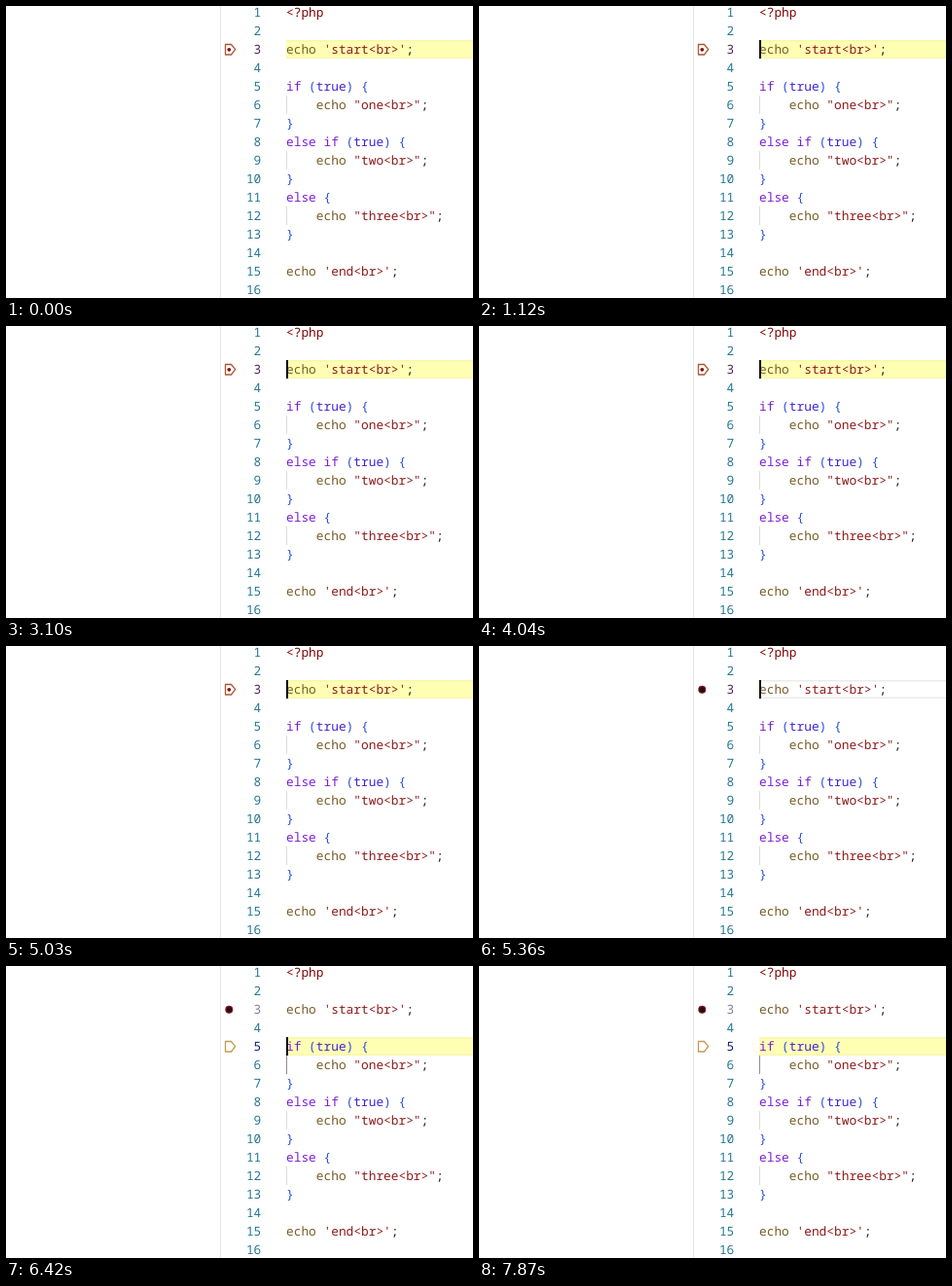
An HTML page for the animation above (8000 ms loop, 480x300 px).

```html
<!DOCTYPE html>
<html lang="en">
<head>
<meta charset="utf-8">
<title>Stepping through code</title>
<style>
  html, body { margin: 0; width: 100%; height: 100%; overflow: hidden; background: #fff; }
  svg { display: block; }
  text {
    font: 12.83px "Noto Sans Mono", "DejaVu Sans Mono", monospace;
    font-variant-ligatures: none;
    text-rendering: geometricPrecision;
    white-space: pre;
    fill: #222;
  }
  .num { text-anchor: end; fill: #237893; }
  .tag { fill: #800000; }
  .echo { fill: #795e26; }
  .str { fill: #8f1a1a; }
  .key { fill: #7c1fd4; }
  .bool { fill: #3f25d0; }
  .brace { fill: #2b4fdc; }
</style>
</head>
<body>
<svg width="480" height="300" viewBox="0 0 480 300">
  <rect x="220" width="1" height="300" fill="#e6e6e6"/>
  <rect id="step" x="288" width="192" height="19" fill="#ffffb4"/>
  <path id="border" d="M288 0h192v1.5h-192zM288 17.5h192v1.5h-192z"/>
  <g id="code"></g>
  <path id="arrow" d="M225.5 4.5h6l4.2 5.2l-4.2 5.3h-6z" fill="#fff" stroke-width="1.3" stroke-linejoin="round"/>
  <circle id="dot" cx="229.3" cy="44.8" stroke="#7d1420"/>
  <rect id="cursor" x="288" width="2" height="19"/>
</svg>
<script>
const LOOP = 8000, ROW = 19, LEFT = 288, CHAR = 7.7;
const RELEASE = 5360, NEXT = 5430;
const GUIDE = "#d9ddd2";
const blinks = [130, 590, 1120, 1580, 2110, 2570, 3100, 3580, 4040, 4570, 5030,
                5890, 6420, 6880, 7410, 7870];
const lines = `<?php

echo 'start<br>';

if (true) {
    echo "one<br>";
}
else if (true) {
    echo "two<br>";
}
else {
    echo "three<br>";
}

echo 'end<br>';
`.split("\n");

const rules = [
  ["tag", /^<\?php/], ["echo", /^echo/], ["str", /^['"]/],
  ["key", /^(if|else)/], ["bool", /^true/], ["brace", /^[(){}]/]
];
const get = id => document.getElementById(id);
const set = (id, attrs) => { for (const k in attrs) get(id).setAttribute(k, attrs[k]); };
const rowTop = n => ROW * n - 22;

function paint(line) {
  const tokens = line.match(/<\?php|'[^']*'|"[^"]*"|\w+|\s+|./g) || [];
  return tokens.map(token => {
    const rule = rules.find(([, pattern]) => pattern.test(token));
    return `<tspan class="${rule ? rule[0] : ""}">${token.replace(/</g, "&lt;")}</tspan>`;
  }).join("");
}

get("code").innerHTML = lines.map((line, i) => {
  const n = i + 1, y = rowTop(n) + 14, indent = line.search(/\S|$/);
  const guide = indent
    ? `<rect id="guide${n}" x="${LEFT}" y="${rowTop(n)}" width="1" height="${ROW}" fill="${GUIDE}"/>` : "";
  return `${guide}<text id="num${n}" class="num" x="262.3" y="${y}">${n}</text>
    <text x="${LEFT + indent * CHAR}" y="${y}">${paint(line.trim())}</text>`;
}).join("");

function draw(t) {
  const held = t < RELEASE, moved = t >= NEXT, paused = held || moved;
  const y = rowTop(moved ? 5 : 3), transform = `translate(0 ${y})`;
  const visibility = paused ? "visible" : "hidden";
  const on = blinks.filter(b => b <= t).length % 2;

  set("step", { y, visibility });
  set("border", { transform, "fill-opacity": paused ? 0.03 : 0.08 });
  set("arrow", { transform, visibility, stroke: moved ? "#c39a52" : "#b0562c" });
  set("dot", {
    r: held ? 1.9 : 3.4,
    fill: held ? "#7d1420" : "#2c0a10",
    "stroke-width": held ? 0 : 1.2
  });
  get("num3").style.fill = moved ? "#83809c" : "#54245c";
  get("num5").style.fill = moved ? "#0b216f" : "";
  set("guide6", { fill: moved ? "#968c86" : GUIDE });
  set("cursor", { y, visibility: on ? "visible" : "hidden" });
}

function tick() {
  draw(performance.now() % LOOP);
  requestAnimationFrame(tick);
}
tick();
</script>
</body>
</html>
```
